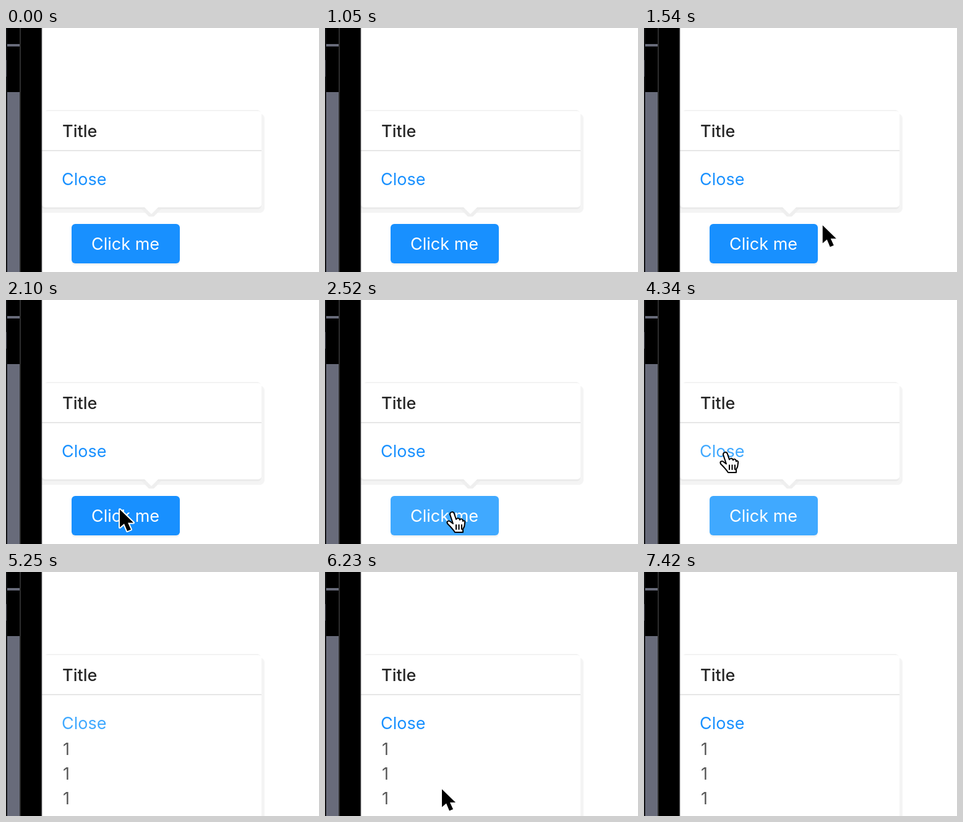
An HTML page for the animation above (8 s loop, 506 by 396 pixels).

```html
<!DOCTYPE html>
<html lang="en">
<head>
<meta charset="utf-8">
<title>Popover</title>
<style>
  html, body { margin: 0; width: 100%; height: 100%; overflow: hidden; background: #fff; }
  svg { display: block; }
  text { font: 27px Inter, "Open Sans", sans-serif; }
  .open rect { height: 300px; }
  .open #tip, #lines { display: none; }
  .open #lines { display: inline; }
</style>
</head>
<body>
<svg width="506" height="396" viewBox="0 0 506 396">
  <rect x="106" y="321" width="175" height="64" rx="6" fill="#f4f4f4"/>
  <rect id="button" x="106" y="318" width="175" height="64" rx="6"/>
  <text x="138" y="360" fill="#fff">Click me</text>

  <g id="popover">
    <rect x="62" y="133" width="350" height="150" rx="6" fill="#f2f2f2"/>
    <rect x="50" y="139" width="368" height="161" rx="8" fill="#f4f4f4"/>
    <rect x="57" y="138" width="356" height="156" rx="6" fill="#ebebeb"/>
    <g id="tip">
      <path d="M219 294H251L239 306H231Z" fill="#efefef"/>
      <path d="M223 290H247L235 302Z" fill="#fff"/>
    </g>
    <rect x="58" y="135" width="355" height="156" rx="5" fill="#fff"/>
    <path d="M58 199H413" stroke="#e6e6e6" stroke-width="2"/>
    <text x="91" y="177" fill="#262626" font-weight="500" style="font-weight:500">Title</text>
    <text id="link" x="90" y="255">Close</text>
    <g id="lines" fill="#595959">
      <text x="92" y="297">1</text>
      <text x="92" y="337">1</text>
      <text x="92" y="377">1</text>
    </g>
  </g>

  <path d="M0 0H58V396H0Z"/>
  <path d="M2 104H22V396H2ZM2 26H22V30H2Z" fill="#686b7a"/>
  <path d="M0 52H1V79H0Z" fill="#686b7a"/>
  <path d="M1 0V396" stroke="#25262b"/>
  <path d="M23 0V396M57.5 0V396" stroke="#3b3b3d" stroke-width="1.5"/>

  <g id="cursor" stroke-linejoin="round" stroke-linecap="round">
    <path id="arrow" d="M0 0V29L7 23L12 35L18 32.500L13 21.500H22Z"
      stroke="#fff" stroke-width="4" paint-order="stroke"/>
    <g id="hand" stroke="#000" stroke-width="2">
      <path fill="#fff" d="M-4 4C-4 -1 2 -1 3 3L6 12C7 9 12 10 12 13C13 10 17 11 17 15
        C18 13 21 14 20 18C20 22 19 25 17 28V33H4C1 28 -4 23 -8 19C-10 15 -6 13 -3 16L1 19Z"/>
      <path d="M6 21V28M10.500 21V28M15 21V28"/>
    </g>
  </g>
</svg>
<script>
const $ = id => document.getElementById(id);
const LOOP = 8000, STEP = 70;

// Cursor stops: time, x, y
const visits = [
  [[1260, 330, 410], [1750, 262, 262], [2030, 262, 262], [2100, 184, 340], [2380, 206, 344],
   [3150, 206, 344], [3360, 217, 344], [3920, 217, 344], [4340, 132, 247], [5250, 132, 247]],
  [[6090, 220, 410], [6440, 132, 247], [7350, 132, 247]]
];

const ramp = (t, from, to) => Math.min(1, Math.max(0, (t - from) / (to - from)));
const ease = p => p * p * (3 - 2 * p);
const within = (t, from, to) => t >= from && t < to;
const blue = k => `rgb(${24 + 40 * k} ${144 + 25 * k} 255)`;
const show = (id, on) => $(id).style.display = on ? "inline" : "none";

function moveCursor(t) {
  const stops = visits.find(v => within(t, v[0][0], v[v.length - 1][0]));
  show("cursor", stops);
  if (!stops) return;
  const i = stops.findIndex(s => s[0] > t);
  const [t0, x0, y0] = stops[i - 1], [t1, x1, y1] = stops[i];
  const p = ease(ramp(t, t0, t1));
  $("cursor").setAttribute("transform", `translate(${x0 + (x1 - x0) * p} ${y0 + (y1 - y0) * p})`);
  const pointing = within(t, 2170, 4060) || within(t, 4200, 5250) || t >= 6370;
  show("hand", pointing);
  show("arrow", !pointing);
}

function draw(now) {
  const t = Math.floor(now % LOOP / STEP) * STEP;
  const linkHover = ramp(t, 4060, 4340) - ramp(t, 5250, 5530)
    + ramp(t, 6230, 6510) - ramp(t, 7350, 7420);
  $("button").setAttribute("fill", blue(ramp(t, 2100, 2450)));
  $("link").setAttribute("fill", blue(linkHover));
  $("popover").classList.toggle("open", t >= 4550);
  moveCursor(t);
}

const start = performance.now();
function tick() {
  draw(performance.now() - start);
  requestAnimationFrame(tick);
}
tick();
</script>
</body>
</html>
```
